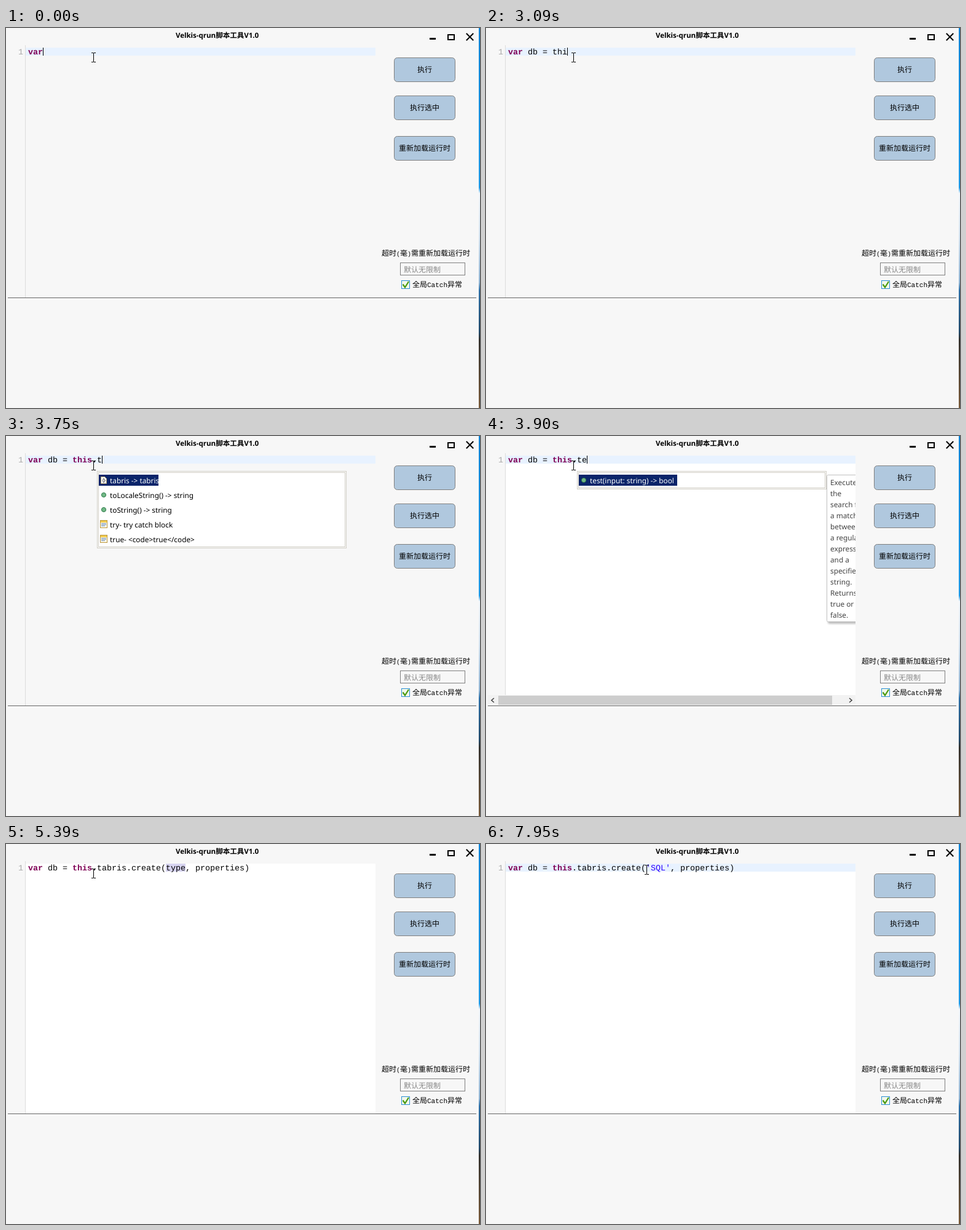
Animation of 771 by 619 pixels, one loop 8 s. Source, as an HTML page:

```html
<!DOCTYPE html>
<html lang="zh">
<head>
<meta charset="utf-8">
<title>脚本工具</title>
<style>
  html, body { margin: 0; width: 100%; height: 100%; overflow: hidden; background: #f7f7f7; }
  svg { display: block; width: 771px; height: 619px; }
  text { white-space: pre; text-rendering: geometricPrecision; }
  .ui { font: 12px "Noto Sans CJK SC", "Noto Sans CJK", sans-serif; }
  .title { font: bold 11.5px "Noto Sans", "Noto Sans CJK SC", "Noto Sans CJK", sans-serif; }
  .half { font: 10px "Liberation Mono", monospace; }
  .latin { font: 11px "Liberation Mono", monospace; }
  .code { font: 13.333px "Liberation Mono", "Courier New", monospace; }
  .key { fill: #7f0055; font-weight: bold; }
  .str { fill: #2a00ff; }
  .hint { font: 11.8px "Noto Sans", Tahoma, sans-serif; }
  .line { fill: none; stroke: #000; }
</style>
</head>
<body>
<svg viewBox="0 0 771 619">
  <defs>
    <linearGradient id="desktop" x2="0" y2="1">
      <stop offset="0" stop-color="#0a84d8"/>
      <stop offset=".42" stop-color="#1c9ae8"/>
      <stop offset=".435" stop-color="#f2f7fb"/>
      <stop offset=".55" stop-color="#d4e3f0"/>
      <stop offset=".67" stop-color="#8fb4d4"/>
      <stop offset=".69" stop-color="#2b6fa8"/>
      <stop offset=".8" stop-color="#1c4668"/>
      <stop offset=".82" stop-color="#2c2a26"/>
      <stop offset="1" stop-color="#7a5a38"/>
    </linearGradient>
    <clipPath id="listClip"><rect x="151" y="60" width="400" height="201"/></clipPath>
    <clipPath id="editorClip"><rect x="32" y="28" width="569" height="411"/></clipPath>
    <filter id="shadow"><feDropShadow dx="2" dy="3" stdDeviation="1.5" flood-opacity=".25"/></filter>
  </defs>

  <rect width="771" height="619" fill="#f7f7f7"/>
  <rect x="769" width="2" height="619" fill="url(#desktop)"/>

  <text class="title" x="343.5" y="16" text-anchor="middle">Velkis-qrun脚本工具V1.0</text>
  <rect x="689" y="16" width="10" height="3"/>
  <rect class="line" x="719" y="11" width="10" height="8" stroke-width="2"/>
  <path class="line" d="M749.5 9.5l10 10m0-10l-10 10" stroke-width="2" stroke-linecap="square"/>

  <g id="buttons" class="ui" text-anchor="middle"></g>
  <text class="ui" x="611" y="371">超时<tspan class="half">(</tspan>毫<tspan class="half">)</tspan>需重新加载运行时</text>
  <rect x="641.5" y="382.5" width="105" height="20" fill="none" stroke="#808080"/>
  <text class="ui" x="647" y="398" fill="#888">默认无限制</text>
  <rect x="643.5" y="411.5" width="13" height="13" fill="#f2f8ea" stroke="#2b8fd6"/>
  <path class="line" d="M645.5 417.5l3.5 5 6-9.5" style="stroke:#4a9a10" stroke-width="2.2"/>
  <text class="ui" x="661" y="422">全局<tspan class="latin">Catch</tspan>异常</text>

  <rect id="paper" x="32" y="32" width="569" fill="#fff"/>
  <rect id="gutter" x="31" y="28" width="1" fill="#ddd"/>
  <rect id="active" x="32" y="32" width="569" height="13" fill="#e8f2ff"/>
  <rect id="selection" x="260" y="32" width="32" height="13" fill="#d7d4f0"/>
  <text class="code" x="28" y="43" text-anchor="end" fill="#aaa">1</text>
  <text class="code" id="code" x="36" y="43"></text>
  <path id="brackets" class="line" style="stroke:#808080" d="M251.5 30.5h9v17h-9zM355.5 30.5h9v17h-9z"/>
  <rect id="caret" y="32" width="1" height="13"/>

  <g id="hscroll">
    <rect x="3" y="422" width="598" height="16" fill="#f2f2f2"/>
    <rect x="20" y="423" width="543" height="15" fill="#cdcdcd"/>
    <path class="line" d="M13 427l-4 3.5 4 3.5M591 427l4 3.5-4 3.5" style="stroke:#444" stroke-width="1.6"/>
  </g>
  <rect x="3" y="439" width="762" height="1" fill="#666"/>

  <g id="popups" class="hint"></g>
  <path id="pointer" class="line" d="M139 40.5h3l.5.5.5-.5h3M142.5 41v14M139 55.5h3l.5-.5.5.5h3"/>
</svg>

<script>
const $ = id => document.getElementById(id);
const show = (id, on) => { $(id).style.display = on ? '' : 'none'; };

$('buttons').innerHTML = [[48, '执行'], [110, '执行选中'], [176, '重新加载运行时']].map(([y, label]) =>
  `<rect x="631.5" y="${y + .5}" width="99" height="39" rx="5" fill="#b0c8de" stroke="#808080"/>
   <text x="681" y="${y + 24}">${label}</text>`).join('');

// Icons are drawn around (159, 0).
const icons = {
  method: '<circle cx="159" r="3.6" fill="#72b886" stroke="#2f7d4c"/>',
  unknown: `<rect x="153" y="-6" width="12" height="12" fill="#f4f8ff"/>
    <text x="159" y="4" text-anchor="middle" font-weight="bold" fill="#1c4f9c">?</text>`,
  object: `<path d="M154.5-5.5h6l3 3v8h-9z" fill="#fff" stroke="#a89868"/>
    <path class="line" d="M159.5-3q-2 0-1.5 2l-1 1.5 1 1.5q-.5 2 1.5 2M159 .5h3M159-1.5h2M159 2.5h2" style="stroke:#555"/>`,
  template: `<rect x="153.5" y="-6.5" width="11" height="12" fill="#fffbe8" stroke="#b8943c"/>
    <rect x="154" y="-6" width="10" height="3" fill="#f2cc50"/>
    <path d="M155-1.5h8M155 .5h8M155 2.5h6" stroke="#6a8cc0"/>`
};

function popup(id, height, selected, rows, extra = '') {
  const items = rows.map(([icon, label], i) =>
    `<g transform="translate(0 ${72 + 24 * i})">${icons[icon]}
     <text x="169" y="4.5" fill="${i ? '#000' : '#fff'}">${label}</text></g>`).join('');
  return `<g id="${id}">
    <rect x="148.5" y="57.5" width="405" height="${height}" fill="#fff" stroke="#d0cdc4"/>
    <rect x="150.5" y="59.5" width="401" height="${height - 4}" fill="none" stroke="#d0cdc4"/>
    <rect x="151" y="63" width="${selected}" height="18" fill="#0a246a"/>
    <g clip-path="url(#listClip)">${items}</g>${extra}</g>`;
}

const methods = ['decodeURI(uri: string) -> string', 'decodeURIComponent(uri: string) -> string',
  'encodeURI(uri: string) -> string', 'encodeURIComponent(uri: string) -> string', 'eval(code: string)',
  'isNaN(value: number) -> bool', 'parseFloat(string: string) -> number',
  'parseInt(string: string, radix?: number) -> number'];

const listScroll = `<rect x="534" y="60" width="17" height="201" fill="#f0f0f0"/>
  <rect x="535" y="77" width="15" height="47" fill="#cdcdcd"/>
  <path class="line" d="M539 71l3.5-4 3.5 4M539 250l3.5 4 3.5-4" style="stroke:#444" stroke-width="1.6"/>`;

const doc = ['Executes', 'the', 'search for', 'a match', 'between', 'a regular', 'expression',
  'and a', 'specified', 'string.', 'Returns', 'true or', 'false.'];
const tooltip = `<g clip-path="url(#editorClip)">
  <rect x="554.5" y="63.5" width="80" height="239" rx="2" fill="#fff" stroke="#c0c0c0" filter="url(#shadow)"/>
  ${doc.map((s, i) => `<text x="560" y="${80 + 18 * i}" fill="#444">${s}</text>`).join('')}</g>`;

$('popups').innerHTML =
  popup('all', 205, 59, [['unknown', 'db -> ?'], ...methods.map(m => ['method', m])], listScroll) +
  popup('t', 125, 97, [['object', 'tabris -> tabris'], ['method', 'toLocaleString() -> string'],
    ['method', 'toString() -> string'], ['template', 'try- try catch block'],
    ['template', 'true- &lt;code>true&lt;/code>']]) +
  popup('te', 29, 160, [['method', 'test(input: string) -> bool']], tooltip);

// Each step: start time, text before the caret, changes to the state.
const start = 'var db = this.', call = start + 'tabris.create(';
const steps = [
  [0, 'var', { caret: true, paper: 0, popup: '', tail: '', active: true }],
  [440, 'var', { caret: false }],
  [590, 'var ', { caret: true }],
  [1150, 'var ', { caret: false }],
  [1710, 'var d', { caret: true }],
  [1830, 'var db'],
  [2290, 'var db '],
  [2540, 'var db = '],
  [2810, 'var db = t'],
  [3090, 'var db = thi'],
  [3230, 'var db = this'],
  [3350, start],
  [3470, start, { popup: 'all' }],
  [3750, start + 't', { popup: 't' }],
  [3900, start + 'te', { popup: 'te', paper: 422 }],
  [4460, start + 'te', { caret: false }],
  [4600, start + 't', { caret: true, popup: 't', paper: 435 }],
  [5010, start + 't', { caret: false }],
  [5150, start + 'tabris', { caret: true, popup: '', paper: 439 }],
  [5270, start + 'tabris.'],
  [5390, call + 'type', { caret: false, active: false, selection: true, tail: ', properties)' }],
  [6160, call, { caret: true, active: true, selection: false, brackets: true }],
  [6410, call + "'", { brackets: false, tail: "', properties)" }],
  [6850, call + "'S"],
  [6990, call + "'SQ"],
  [7110, call + "'SQL"],
  [7670, call + "'SQL", { caret: false }],
  [7950, call + "'SQL", { moved: true }]
];
let state = {};
const states = steps.map(([time, text, change]) => (state = { ...state, ...change, time, text }));

const highlight = s => s.replace(/\b(?:var|this)\b|'[^']*'/g,
  w => `<tspan class="${w[0] === "'" ? 'str' : 'key'}">${w}</tspan>`);

function render(s) {
  $('code').innerHTML = highlight(s.text + s.tail);
  $('caret').setAttribute('x', 36 + 8 * s.text.length);
  $('paper').setAttribute('height', Math.max(0, s.paper - 32));
  $('gutter').setAttribute('height', (s.paper || 439) - 28);
  $('pointer').setAttribute('transform', s.moved ? 'translate(119 -6)' : '');
  for (const id of ['caret', 'active', 'selection', 'brackets']) show(id, s[id]);
  for (const id of ['all', 't', 'te']) show(id, s.popup === id);
  show('hscroll', s.popup === 'te');
}

let current;
function tick() {
  const t = performance.now() % 8000;
  const next = states.findLast(s => s.time <= t);
  if (next !== current) render(current = next);
  requestAnimationFrame(tick);
}
tick();
</script>
</body>
</html>
```
